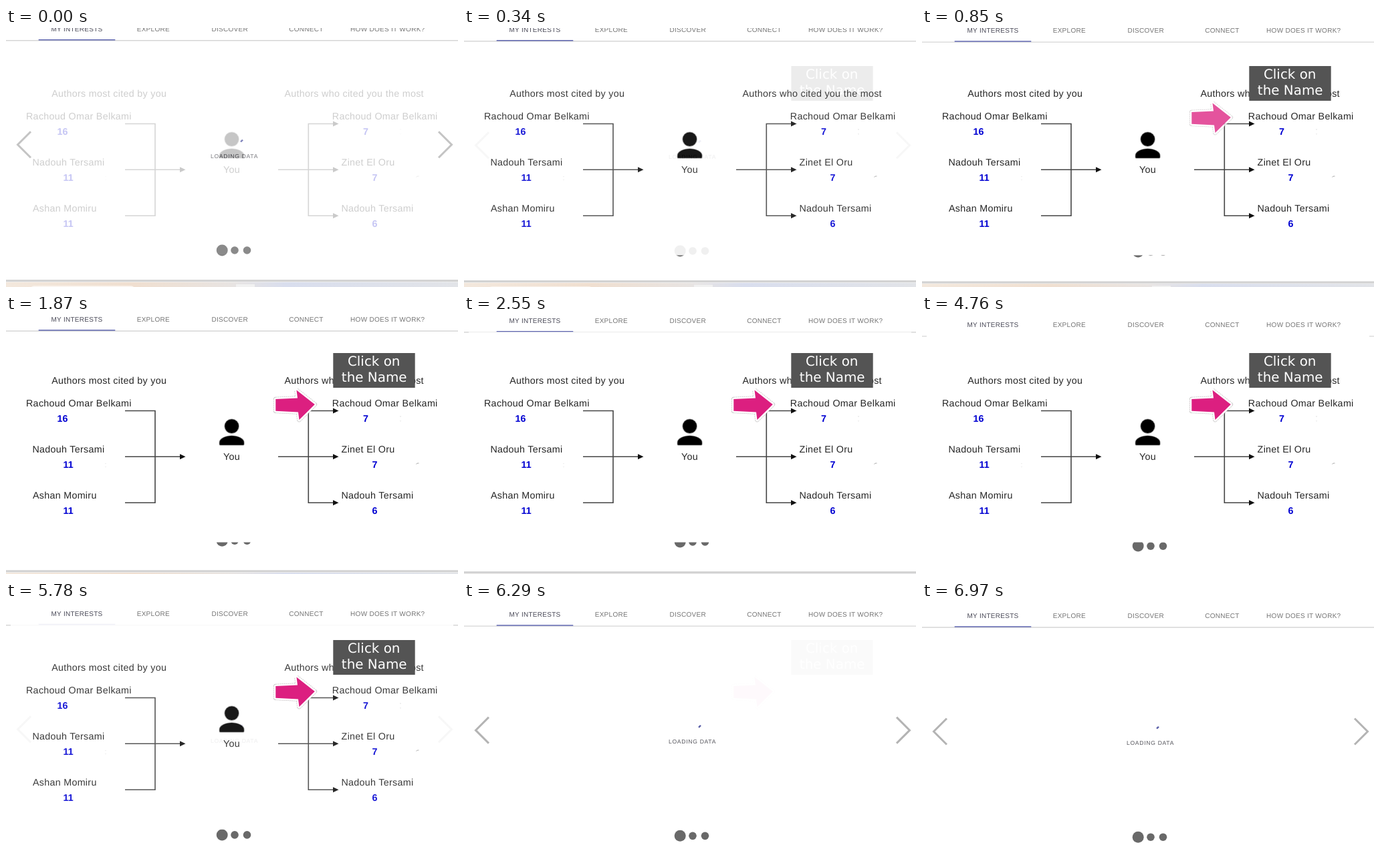
An HTML page for the animation above (8160 ms loop, 676 px wide and 388 px high).

```html
<!DOCTYPE html>
<html lang="en">
<head>
<meta charset="utf-8">
<title>Citation overview</title>
<style>
html, body { margin: 0; width: 100%; height: 100%; overflow: hidden; background: #fff; }
svg { display: block; width: 676px; height: 388px; font-family: "Liberation Sans", Arial, sans-serif; text-rendering: geometricPrecision; }
.nav { font-size: 10px; letter-spacing: .286px; fill: #747474; text-anchor: middle; }
.load { font-size: 8.57px; letter-spacing: .714px; fill: #55555c; }
.label { font-size: 14.3px; letter-spacing: .3px; fill: #262626; }
.count { font-size: 14.3px; font-weight: bold; fill: #0000d2; }
.link { fill: none; stroke: #444; stroke-width: 1.6; }
.chevron { fill: none; stroke: #b4b4b4; stroke-width: 3; }
.tip { font: 19.9px "DejaVu Sans", Verdana, sans-serif; fill: #fff; text-anchor: middle; }
</style>
</head>
<body>
<svg viewBox="0 0 676 388">
  <defs>
    <linearGradient id="desk">
      <stop offset="0" stop-color="#f3e8dd"/>
      <stop offset=".28" stop-color="#f0dfd0"/>
      <stop offset=".5" stop-color="#e8e4e2"/>
      <stop offset=".62" stop-color="#d9deee"/>
      <stop offset="1" stop-color="#e2e4e8"/>
    </linearGradient>
    <path id="arrow" d="M403.3 126L436 124.5L434.5 112.5L461.8 134L438.5 157L437 145.5L403.3 143.8Z"/>
  </defs>

  <g id="page">
    <g class="nav">
      <text x="106" y="23.8" fill="#4a4a58">MY INTERESTS</text>
      <text x="220.3" y="23.8">EXPLORE</text>
      <text x="334.7" y="23.8">DISCOVER</text>
      <text x="449" y="23.8">CONNECT</text>
      <text x="570.8" y="23.8">HOW DOES IT WORK?</text>
    </g>
    <path d="M0 38H676" stroke="#d6d6d6" stroke-width="1.4"/>
    <path d="M48.7 36.9H163.3" stroke="#5f66b0" stroke-width="1.5"/>
    <path class="chevron" d="M37 174.5L17.5 194L37 213.5M647 174.5L666.5 194L647 213.5"/>
    <path d="M351 189.7L354 186.8" stroke="#5a5fa8" stroke-width="2.4"/>
    <text class="load" x="306" y="214.2">LOADING DATA</text>
    <g fill="#696969">
      <circle cx="323.2" cy="352.2" r="8.5"/>
      <circle cx="342" cy="352.2" r="5.8"/>
      <circle cx="360.5" cy="352.2" r="5.8"/>
    </g>
    <rect y="400" width="676" height="24" fill="url(#desk)"/>
    <rect x="36" y="405.5" width="157" height="16" rx="6" fill="#fbf6f1"/>
    <rect x="344" y="403" width="28" height="16" fill="#f1f1f1"/>
    <rect y="396.3" width="676" height="3.2" fill="#d2d2d2"/>
  </g>

  <g id="panel">
    <rect x="7" y="25.5" width="662" height="315" fill="#fff"/>
    <g class="label">
      <text x="68.2" y="103.2">Authors most cited by you</text>
      <text x="416.4" y="103.2">Authors who cited you the most</text>
      <text x="30" y="137.4">Rachoud Omar Belkami</text>
      <text x="39.4" y="206.4">Nadouh Tersami</text>
      <text x="39.9" y="275.3">Ashan Momiru</text>
      <text x="487.8" y="137.4">Rachoud Omar Belkami</text>
      <text x="501.6" y="206.4">Zinet El Oru</text>
      <text x="501.4" y="275.3">Nadouh Tersami</text>
      <text x="325" y="217.3">You</text>
    </g>
    <g class="count">
      <text x="76.6" y="160">16</text>
      <text x="85.6" y="229">11</text>
      <text x="85.6" y="297.6">11</text>
      <text x="534" y="160">7</text>
      <text x="547.5" y="229">7</text>
      <text x="547.6" y="297.6">6</text>
    </g>
    <path class="link" d="M178 143.5H223V281.3H178M178 212.3H262M407 212.3H491M491 143.5H452.3V281.3H491"/>
    <path fill="#111" d="M260 208.3l8.5 4l-8.5 4zM489 208.3l8.5 4l-8.5 4zM489 139.5l8.5 4l-8.5 4zM489 277.3l8.5 4l-8.5 4z"/>
    <g stroke="#999" stroke-width="1.6" paint-order="stroke">
      <circle cx="337.6" cy="166.6" r="10.4"/>
      <path d="M319.4 193.4V191C319.4 185 329 181 337.6 181S355.8 185 355.8 191V193.4Q355.8 194.8 354.4 194.8H320.8Q319.4 194.8 319.4 193.4Z"/>
    </g>
    <path d="M613.5 223.5q1-2 4-1.5" fill="none" stroke="#aaa"/>
    <path d="M590 151v2M590 158v1.5M149 222v1M149 227v1" stroke="#ddd"/>
  </g>

  <g id="callout">
    <rect x="489.3" y="57" width="122.4" height="52" fill="#545454"/>
    <text class="tip" x="550.2" y="76.3">Click on</text>
    <text class="tip" x="550.7" y="100.3">the Name</text>
  </g>

  <g id="pointer" stroke-linejoin="round">
    <use href="#arrow" stroke="#c4c4c4" stroke-width="6.6" stroke-dasharray="2 1"/>
    <use href="#arrow" fill="#dc1f80" stroke="#fff" stroke-width="5" paint-order="stroke"/>
  </g>
</svg>
<script>
const LOOP = 8160, STEP = 170, END = 6970;
const $ = id => document.getElementById(id);
const clamp = v => Math.max(0, Math.min(1, v));
// Opacity of a layer that fades in from a to b and out from c to d
const fade = (t, a, b, c, d) => clamp((t - a) / (b - a)) * clamp((d - t) / (d - c));

function draw(now) {
  const t = Math.min(END, Math.floor(now % LOOP / STEP) * STEP);
  $("page").setAttribute("transform", `translate(0 ${(-19.2 * (1 - t / END)).toFixed(2)})`);
  $("panel").style.opacity = fade(t, -110, 390, 5730, 6230);
  $("callout").style.opacity = fade(t, 300, 700, 5800, 6300);
  $("pointer").style.opacity = fade(t, 460, 970, 5800, 6300);
}

const start = performance.now();
function tick() {
  draw(performance.now() - start);
  requestAnimationFrame(tick);
}
tick();
</script>
</body>
</html>
```
